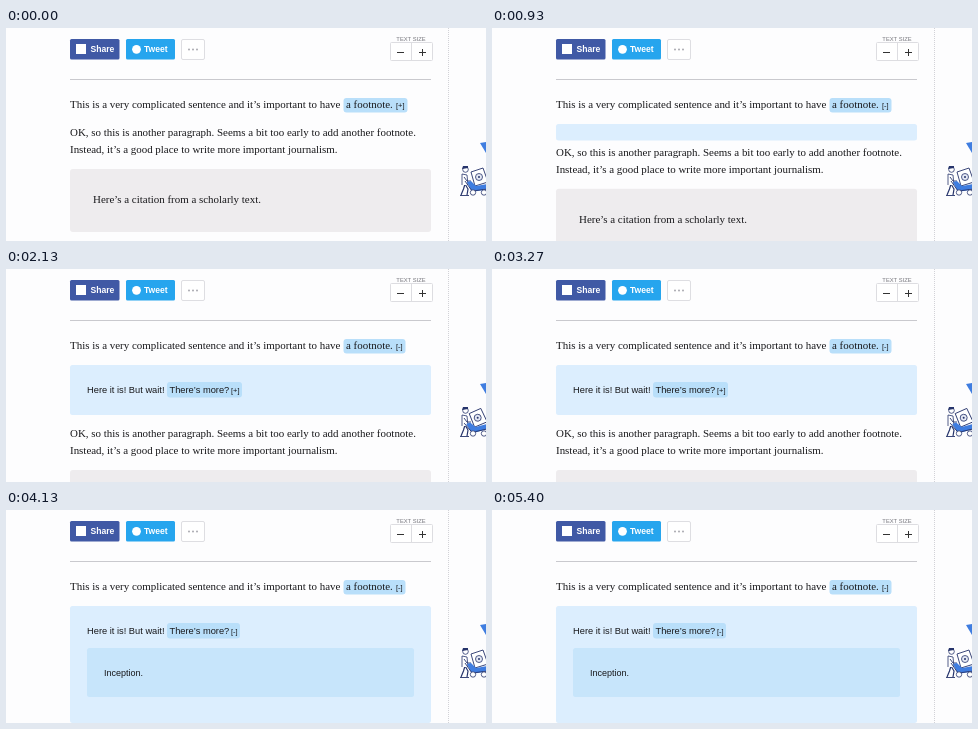
Animation of 480x213 px, one loop 5.47 s. Source, as an HTML page with a canvas:

```html
<!DOCTYPE html>
<html lang="en">
<head>
<meta charset="utf-8">
<title>Nested footnotes</title>
<style>
html, body { margin: 0; width: 100%; height: 100%; overflow: hidden; background: #fdfdfe; }
canvas { display: block; width: 480px; height: 213px; }
</style>
</head>
<body>
<canvas id="stage"></canvas>
<script>
const LOOP = 5470, W = 480, H = 213;
const SERIF = '10.95px "Liberation Serif", serif';
const SANS = '9.3px "Liberation Sans", sans-serif';
const MARK = '7.5px "Liberation Sans", sans-serif';
const INK = '#18181b', NAVY = '#26346b', BLUE = '#3f7de0';
const canvas = document.getElementById('stage');
const ctx = canvas.getContext('2d');
const ratio = window.devicePixelRatio || 1;
canvas.width = W * ratio;
canvas.height = H * ratio;

const ease = (t, start, length) => {
  const p = Math.min(1, Math.max(0, (t - start) / length));
  return 1 - (1 - p) ** 3;
};

function text(value, x, y, font, color = INK, align = 'left') {
  ctx.font = font;
  ctx.fillStyle = color;
  ctx.textAlign = align;
  ctx.fillText(value, x, y);
}

function box(x, y, w, h, r, fill, border) {
  ctx.beginPath();
  ctx.roundRect(x, y, w, h, r);
  if (fill) { ctx.fillStyle = fill; ctx.fill(); }
  if (border) { ctx.strokeStyle = border; ctx.lineWidth = 1; ctx.stroke(); }
}

function line(color, width, ...points) {
  ctx.beginPath();
  points.forEach(([x, y]) => ctx.lineTo(x, y));
  ctx.strokeStyle = color;
  ctx.lineWidth = width;
  ctx.stroke();
}

function polygon(fill, ...points) {
  ctx.beginPath();
  points.forEach(([x, y]) => ctx.lineTo(x, y));
  ctx.closePath();
  ctx.fillStyle = fill;
  ctx.fill();
}

function circle(x, y, r, fill, border) {
  ctx.beginPath();
  ctx.arc(x, y, r, 0, Math.PI * 2);
  if (fill) { ctx.fillStyle = fill; ctx.fill(); }
  if (border) { ctx.strokeStyle = border; ctx.lineWidth = 0.8; ctx.stroke(); }
}

function clipped(x, y, w, h, draw) {
  ctx.save();
  ctx.beginPath();
  ctx.rect(x, y, w, h);
  ctx.clip();
  draw();
  ctx.restore();
}

function toolbar() {
  const label = 'bold 8.6px "Liberation Sans", sans-serif';
  box(64, 11, 49.5, 20.5, 1.5, '#4059a5');
  box(70, 16, 10, 10, 0, '#fff');
  text('Share', 84.5, 24.3, label, '#fff');
  box(120, 11, 49, 20.5, 1.5, '#26a5ee');
  circle(130.5, 21.3, 4.4, '#fff');
  text('Tweet', 138, 24.3, label, '#fff');
  box(175.5, 11.5, 23, 20, 1.5, '#fff', '#dedee2');
  [183, 187, 191].forEach(x => circle(x, 21.5, 1, '#aaaab0'));

  text('TEXT SIZE', 405, 12.5, '5.8px "Liberation Sans", sans-serif', '#77777d', 'center');
  box(384.5, 14.5, 42, 18, 1, '#fff', '#dddde1');
  line('#dddde1', 1, [405.5, 14.5], [405.5, 32.5]);
  line('#333', 1, [391, 24.5], [398, 24.5]);
  line('#333', 1, [413, 24.5], [420, 24.5]);
  line('#333', 1, [416.5, 21], [416.5, 28]);
  line('#c9c9ce', 1, [64, 51.5], [425, 51.5]);
}

// Worker pushing a crate, cut off by the right edge of the stage.
function worker(t) {
  const lean = ease(t, 950, 250) - ease(t, 3450, 350);
  ctx.setLineDash([1, 1]);
  line('#d2d2d7', 1, [442.5, 0], [442.5, H]);
  ctx.setLineDash([]);
  polygon(BLUE, [474, 115], [480, 114], [480, 125]);

  line(NAVY, 1.2, [459, 156], [457.5, 161], [455, 167]);
  line(NAVY, 1.2, [459, 156], [462, 161], [461, 167]);
  polygon('#fff', [456, 146], [461, 147], [462, 157], [456, 157]);
  line(NAVY, 0.8, [456, 157], [456, 146], [461, 147], [462, 157]);
  circle(459.5, 141.5, 2.8, '#fff', NAVY);
  polygon(NAVY, [456, 141], [457, 138], [462, 138], [462, 140]);
  line(NAVY, 0.9, [458, 149], [461, 153], [465, 153]);
  line(NAVY, 0.9, [454, 167.5], [463, 167.5]);

  ctx.save();
  ctx.translate(470, 162);
  ctx.rotate(-0.1 * lean);
  polygon('#fff', [-5, -18], [7, -22], [12, -8], [-1, -4]);
  line(NAVY, 0.9, [-1, -4], [-5, -18], [7, -22], [12, -8], [-1, -4]);
  circle(3, -13, 3.5, '#e4e8f4', NAVY);
  circle(3, -13, 1, NAVY);
  polygon(BLUE, [-9, -8], [-5, -9], [0, -4], [12, -6], [12, -1], [-4, 2]);
  line(NAVY, 0.9, [-11, -9], [-4, 1], [12, -1]);
  ctx.restore();
  circle(467, 164.5, 2.7, '#fff', NAVY);
  circle(478, 164.5, 2.7, '#fff', NAVY);
}

function article(t) {
  const first = ease(t, 900, 250);
  const second = ease(t, 3300, 250);
  const shift = 60 * first + 67 * second;

  text('This is a very complicated sentence and it’s important to have', 64, 80, SERIF);
  box(337.5, 70, first ? 62 : 64, 14.5, 3, '#b9dffa');
  text('a footnote.', 340, 80, SERIF);
  text(first ? '[-]' : '[+]', 390, 80, MARK);

  if (first) {
    const height = 50 * first + 67 * second;
    box(64, 96, 361, height, 2.5, '#dceefe');
    clipped(64, 96, 361, height, () => footnote(second));
  }

  text('OK, so this is another paragraph. Seems a bit too early to add another footnote.', 64, 108 + shift, SERIF);
  text('Instead, it’s a good place to write more important journalism.', 64, 125 + shift, SERIF);
  box(64, 141 + shift, 361, 63, 3, '#eeecee');
  text('Here’s a citation from a scholarly text.', 87, 175 + shift, SERIF);
}

function footnote(open) {
  text('Here it is! But wait!', 81, 124, SANS);
  box(161, 113, open ? 73 : 75, 15.5, 3, '#b9dffa');
  text('There’s more?', 163.5, 124, SANS);
  text(open ? '[-]' : '[+]', 225, 124, MARK);
  if (!open) return;
  const height = 49 * open;
  box(81, 138, 327, height, 2.5, '#c7e5fb');
  clipped(81, 138, 327, height, () => text('Inception.', 98, 165.5, '9px "Liberation Sans", sans-serif'));
}

function render(now) {
  const t = now % LOOP;
  ctx.setTransform(ratio, 0, 0, ratio, 0, 0);
  ctx.fillStyle = '#fdfdfe';
  ctx.fillRect(0, 0, W, H);
  toolbar();
  article(t);
  worker(t);
}

const began = performance.now();
function tick() {
  render(performance.now() - began);
  requestAnimationFrame(tick);
}
tick();
</script>
</body>
</html>
```
